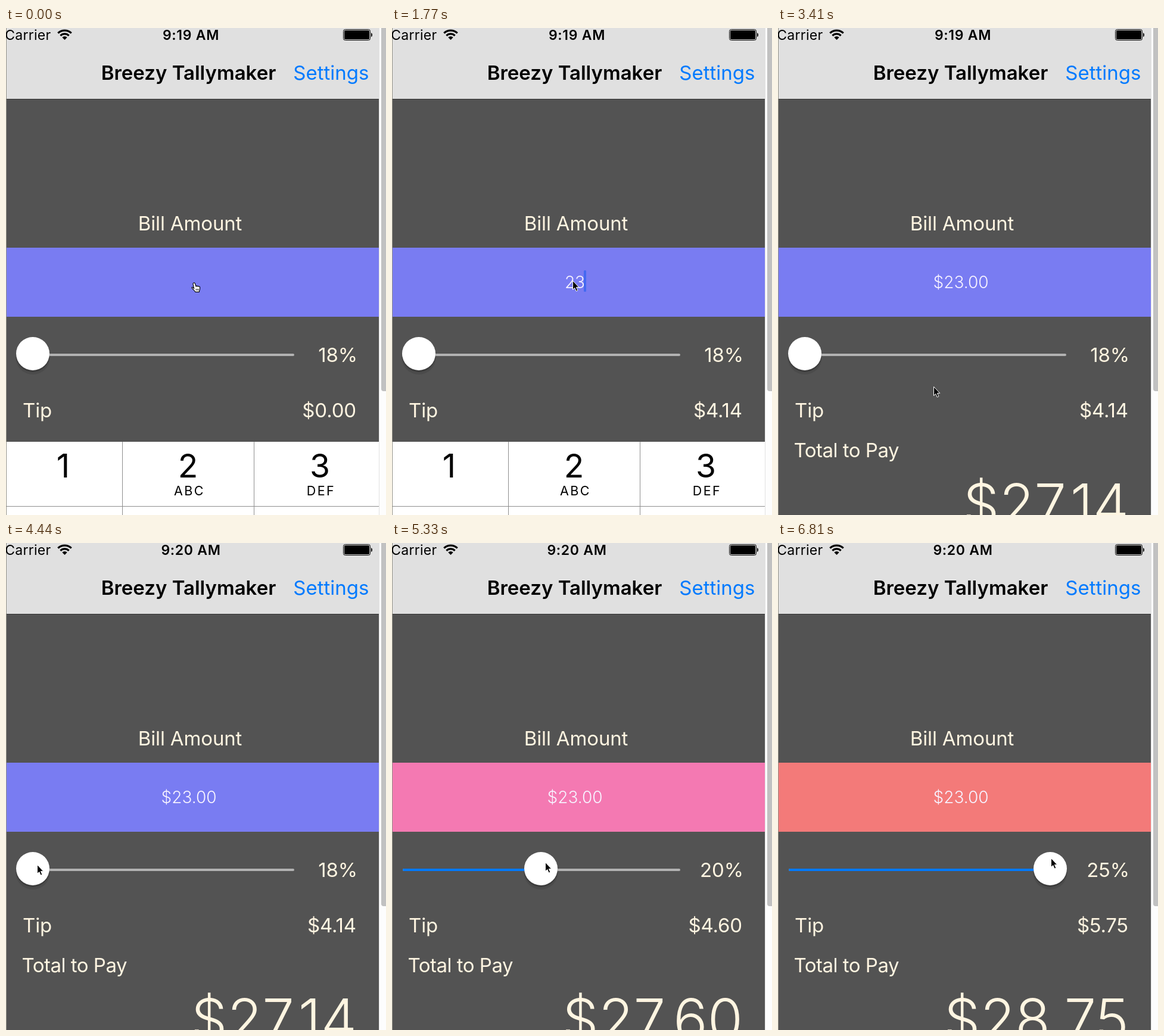
An HTML page that plays this animation: 638 by 818 pixels, repeating every 8000 ms.

```html
<!DOCTYPE html>
<html lang="en">
<head>
<meta charset="utf-8">
<title>Tip calculator</title>
<style>
  html, body { margin: 0; width: 100%; height: 100%; overflow: hidden; background: #fff; }
  svg { display: block; width: 638px; height: 818px; }
  text { font-family: Inter, Roboto, "Liberation Sans", sans-serif; white-space: pre; }
  .label { font-size: 33px; letter-spacing: -.15px; fill: #fff5e1; }
  .status { font-size: 23px; letter-spacing: .3px; }
  .digit { font-size: 55px; text-anchor: middle; }
  .letters { font-size: 21.5px; letter-spacing: 2.4px; text-anchor: middle; }
  .end { text-anchor: end; }
  .mid { text-anchor: middle; }
</style>
</head>
<body>
<svg viewBox="0 0 638 818">
  <rect width="638" height="818" fill="#fdfdfd"/>
  <rect x="626" width="1" height="818" fill="#e2e2e2"/>
  <rect x="630" y="-10" width="12" height="620" rx="4" fill="#c1c1c1"/>

  <rect width="626" height="119" fill="#e0e0e0"/>
  <rect y="119" width="626" height="1" fill="#343434"/>
  <rect y="120" width="626" height="698" fill="#535353"/>
  <rect width="1" height="818" fill="#96958a"/>

  <text class="status end" x="75.5" y="20">Carrier</text>
  <g fill="none" stroke="#000" stroke-width="3.2">
    <path d="M87.3 8.6A16 16 0 0 1 109.7 8.6"/>
    <path d="M91.4 12.8A10 10 0 0 1 105.6 12.8"/>
  </g>
  <path d="M98.5 20L94.3 15.8A6 6 0 0 1 102.7 15.8Z"/>
  <text id="clock" class="status mid" x="310.5" y="20" font-weight="600" style="letter-spacing:.7px"></text>
  <rect x="566.5" y="2.5" width="45" height="18" rx="3" fill="none" stroke="#000"/>
  <rect x="568" y="4" width="42" height="15" rx="1.5"/>
  <path d="M613 8q2 .5 2 3.5t-2 3.5z"/>

  <text class="mid" x="306.5" y="87" font-size="33" font-weight="600">Breezy Tallymaker</text>
  <text class="end" x="609.5" y="87" font-size="33" fill="#007aff">Settings</text>

  <text class="label mid" x="309" y="339.5">Bill Amount</text>
  <rect id="field" x="1" y="369" width="625" height="116"/>
  <text id="bill" class="mid" x="307" y="436.5" font-size="28" font-weight="350" fill="#f7f3ff"></text>
  <rect id="caret" y="407" width="4" height="36" rx="1.5" fill="#4469f0"/>

  <rect x="18" y="547" width="466" height="4" rx="2" fill="#b2b2b2"/>
  <rect id="filled" x="18" y="547" height="4" rx="2" fill="#007aff"/>
  <g id="thumb">
    <circle cy="553" r="29" fill="#000" opacity=".1"/>
    <circle cy="550" r="28" fill="#000" opacity=".2"/>
    <circle cy="547" r="28" fill="#fff"/>
  </g>
  <text id="rate" class="label end" x="590" y="561"></text>

  <text class="label" x="28" y="653.5">Tip</text>
  <text id="tip" class="label end" x="588" y="653.5"></text>

  <g id="summary">
    <text class="label" x="26.5" y="721" style="letter-spacing:-.5px">Total to Pay</text>
    <text id="total" class="end" x="589" y="835" font-size="96" font-weight="350" fill="#fff5e1"></text>
  </g>

  <g id="keypad">
    <rect x="1" y="695" width="625" height="123" fill="#fff"/>
    <path d="M195.5 695V818M416.5 695V818M1 803.5H626" stroke="#8e8e8e"/>
    <text class="digit" x="96" y="755">1</text>
    <text class="digit" x="305.5" y="755">2</text>
    <text class="digit" x="527" y="755">3</text>
    <text class="letters" x="308" y="785">ABC</text>
    <text class="letters" x="529" y="785">DEF</text>
  </g>

  <g id="pointer">
    <path id="arrow" d="M.5.5V15.5L3.8 12.4L6.2 18L8.8 16.9L6.4 11.4H10.8Z" fill="#000" stroke="#fff" stroke-width="1"/>
    <g id="hand" transform="translate(-2)" fill="#fff" stroke="#000" stroke-width="1.1">
      <path d="M4 1.2c1-.8 2-.2 2.3.8L8 7c.5-1.2 2-1 2.3 0 .6-1 2-.6 2.2.4 .8-.7 2-.2 2 .8V11c0 2-1 3-1.2 5.4H7C6 14.2 3 12 1.2 9.8 .4 8.6 1.8 8 2.8 8.8L4.6 10.4 3 2.6C2.9 2 3.4 1.4 4 1.2Z"/>
      <path d="M8.2 11v3M10.2 11v3M12.1 11v3" stroke-width=".8"/>
    </g>
  </g>
</svg>
<script>
const LOOP = 8000, TICK = 148;
const $ = id => document.getElementById(id);
const money = v => "$" + v.toFixed(2);

// Rows are [tick, values...], with straight travel between rows.
const pointerPath = [
  [0, 313, 427], [1, 314, 425], [2, 314, 425], [6, 304, 425], [8, 303, 424], [13, 303, 424],
  [14, 299, 413], [16, 268, 387], [17, 266, 430], [20, 261, 602], [25, 261, 602],
  [26, 240, 600], [29, 64, 545], [30, 52, 540], [31, 52, 540], [32, 76, 540],
  [33, 136, 539], [34, 200, 538], [35, 248, 537], [36, 257, 536], [39, 257, 536],
  [43, 417, 520], [44, 417, 520], [46, 458, 529]
];
const thumbPath = [
  [31, 45], [32, 70], [33, 130], [34, 195], [35, 243], [36, 250], [39, 250],
  [43, 395], [44, 395], [46, 457]
];
const levels = [
  { from: 0, rate: 18, color: "#797cf2" },
  { from: 36, rate: 20, color: "#f479b2" },
  { from: 46, rate: 25, color: "#f37a79" }
];
const typing = [
  { from: 0, text: "", caret: 305 },
  { from: 11, text: "2", caret: 314 },
  { from: 12, text: "23", caret: 322 },
  { from: 23, text: "$23.00" }
];
const caretOn = [[4, 7], [9, 15], [18, 23]];

const current = (rows, n) => rows.filter(r => r.from <= n).pop();

function along(rows, n) {
  const i = rows.findIndex(r => r[0] > n);
  if (i === 0) return rows[0].slice(1);
  if (i < 0) return rows[rows.length - 1].slice(1);
  const a = rows[i - 1], b = rows[i], k = (n - a[0]) / (b[0] - a[0]);
  return a.slice(1).map((v, j) => v + (b[j + 1] - v) * k);
}

const show = (id, on) => $(id).setAttribute("visibility", on ? "visible" : "hidden");
const set = (id, name, value) => $(id).setAttribute(name, value);

function draw(n) {
  const level = current(levels, n), entry = current(typing, n);
  const amount = Number(entry.text.replace("$", "")), done = n >= 23;
  const tip = amount * level.rate / 100;

  $("clock").textContent = n < 28 ? "9:19 AM" : "9:20 AM";
  $("bill").textContent = entry.text;
  $("rate").textContent = level.rate + "%";
  $("tip").textContent = money(tip);
  $("total").textContent = money(amount + tip);
  set("field", "fill", level.color);

  show("caret", caretOn.some(([a, b]) => n >= a && n < b));
  set("caret", "x", entry.caret || 0);
  show("keypad", !done);
  show("summary", done);

  const [x] = along(thumbPath, n);
  set("thumb", "transform", `translate(${x})`);
  set("filled", "width", x - 18);

  const [px, py] = along(pointerPath, n).map(Math.round);
  set("pointer", "transform", `translate(${px} ${py})`);
  show("hand", n < 6);
  show("arrow", n >= 6);
}

let last = -1;
const start = performance.now();
function frame(now) {
  const t = Math.max(0, now - start) % LOOP;
  const n = Math.floor((t + 6) / TICK);
  if (n !== last) draw(last = n);
  requestAnimationFrame(frame);
}
draw(0);
requestAnimationFrame(frame);
</script>
</body>
</html>
```
